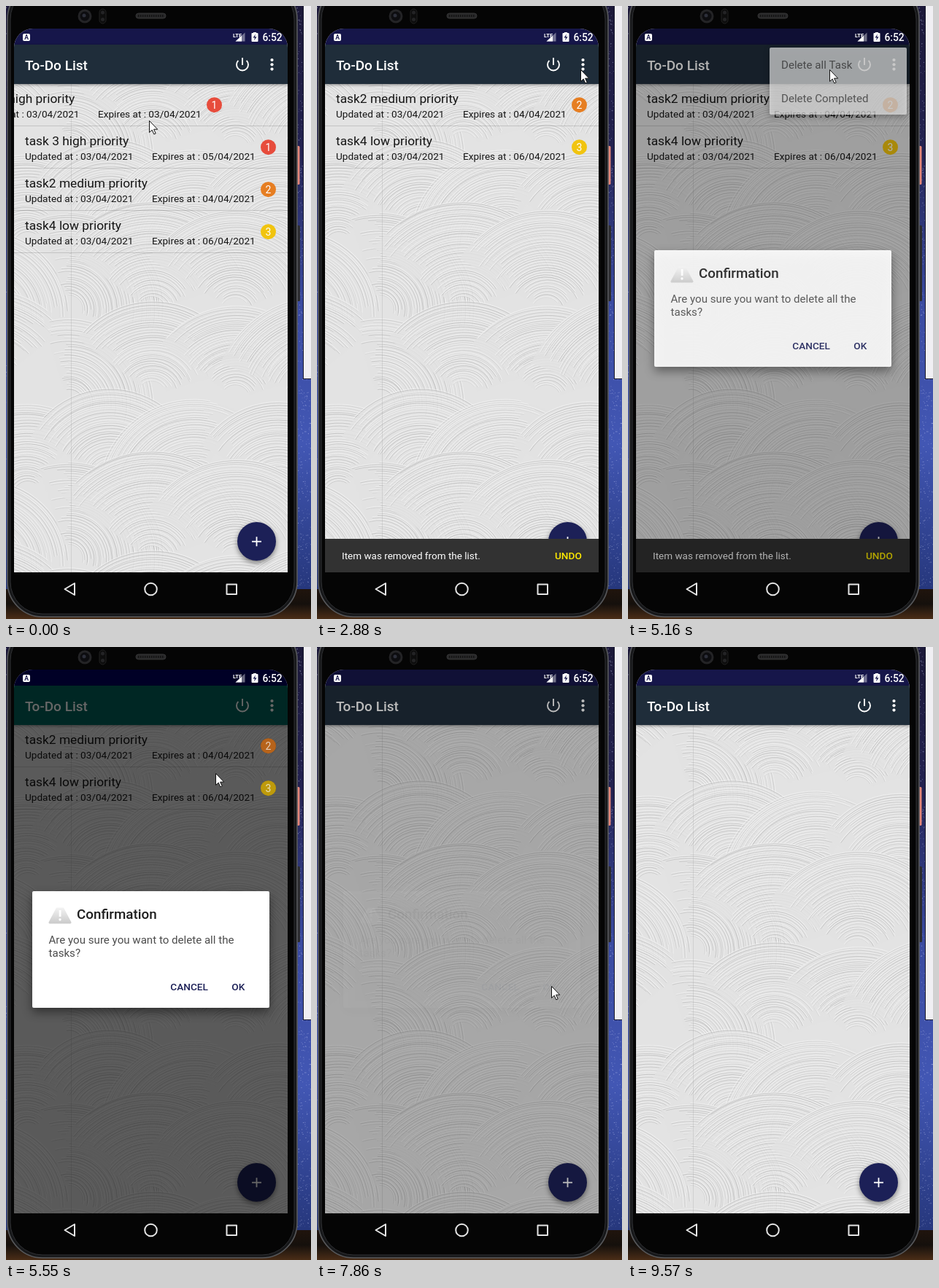
These frames come from a looping animation (418 by 841 pixels, 9970 ms). An HTML page with a canvas:

```html
<!DOCTYPE html>
<html lang="en">
<head>
<meta charset="utf-8">
<title>To-Do List</title>
<style>
html, body { margin: 0; width: 100%; height: 100%; overflow: hidden; background: #000; }
canvas { display: block; width: 418px; height: 841px; }
</style>
</head>
<body>
<canvas id="stage"></canvas>
<script>
const W = 418, H = 841, LOOP = 9970, TICKS = 74, TAU = Math.PI * 2;
const LEFT = 11, TOP = 31, WIDE = 375, TALL = 746, LIST_Y = 107, ROW_H = 58;
const NAVY = '#1c2057', INK = '#161616';
const ratio = window.devicePixelRatio || 1;
const canvas = document.getElementById('stage');
canvas.width = W * ratio;
canvas.height = H * ratio;
const view = canvas.getContext('2d');
let c = view;

const tasks = [
  { name: 'task 1 high priority', day: 3, level: 1 },
  { name: 'task 3 high priority', day: 5, level: 1 },
  { name: 'task2 medium priority', day: 4, level: 2 },
  { name: 'task4 low priority', day: 6, level: 3 }
];
const levelColors = ['#e74c3c', '#e67e22', '#f1c40f'];

// Pointer moves: first tick, last tick, destination
const moves = [
  [0, 4, 110, 148], [4, 8, 143, 120], [8, 10, 190, 115], [10, 16, 383, 95], [16, 21, 361, 87],
  [27, 31, 276, 87], [38, 41, 287, 173], [41, 44, 290, 377],
  [44, 47, 176, 460], [47, 50, 373, 490], [50, 53, 321, 465], [61, 69, 361, 822]
];

const ramp = (n, a, b) => Math.min(1, Math.max(0, (n - a) / (b - a)));
const pulse = (n, a, b, d, e) => ramp(n, a, b) - ramp(n, d, e);

function seeded(seed) {
  return () => (seed = (seed * 16807) % 2147483647) / 2147483647;
}

function rect(x, y, w, h, color) {
  c.fillStyle = color;
  c.fillRect(x, y, w, h);
}
function paint(fill, line, width) {
  if (fill) { c.fillStyle = fill; c.fill(); }
  if (line) { c.strokeStyle = line; c.lineWidth = width; c.stroke(); }
}
function box(x, y, w, h, r, fill, line, width = 1) {
  c.beginPath();
  c.roundRect(x, y, w, h, r);
  paint(fill, line, width);
}
function disc(x, y, r, fill, line, width = 1) {
  c.beginPath();
  c.arc(x, y, r, 0, TAU);
  paint(fill, line, width);
}
function poly(points, fill, line, width = 1) {
  c.beginPath();
  points.forEach(([x, y]) => c.lineTo(x, y));
  c.closePath();
  paint(fill, line, width);
}
function text(s, x, y, size, color, weight = 400, align = 'left') {
  c.font = `${weight} ${size}px Roboto, sans-serif`;
  c.textAlign = align;
  c.fillStyle = color;
  c.fillText(s, x, y);
}
function fade(y0, y1, ...colors) {
  const g = c.createLinearGradient(0, y0, 0, y1);
  colors.forEach((color, i) => g.addColorStop(i / (colors.length - 1), color));
  return g;
}
function raised(blur, dy, draw) {
  c.save();
  c.shadowColor = 'rgba(0,0,0,.45)';
  c.shadowBlur = blur * ratio;
  c.shadowOffsetY = dy * ratio;
  draw();
  c.restore();
}
function layer(alpha, draw) {
  c.save();
  c.globalAlpha = alpha;
  draw();
  c.restore();
}

function prerender(draw) {
  const sheet = document.createElement('canvas');
  sheet.width = canvas.width;
  sheet.height = canvas.height;
  c = sheet.getContext('2d');
  c.scale(ratio, ratio);
  draw();
  c = view;
  return sheet;
}

// One sweep of the brush: concentric strokes that start and end unevenly
function sweep(x, y, radius, tilt, rnd) {
  const from = tilt - 1.1, to = tilt + 1.1;
  c.beginPath();
  c.arc(x, y, radius, from, to);
  c.arc(x, y, 20, to, from, true);
  paint('rgba(227,227,227,.8)');
  for (let r = 20; r < radius; r += 2.2 + rnd() * 2.6) {
    const a = from + rnd() * 0.35, b = to - rnd() * 0.35;
    const wobble = rnd() * 4 - 2;
    c.beginPath();
    c.arc(x + wobble, y, r + 1.2, a, b);
    paint(null, 'rgba(246,246,246,.6)', 1.2);
    c.beginPath();
    c.arc(x + wobble, y, r, a, b);
    paint(null, `rgba(150,150,150,${0.1 + rnd() * 0.35})`, 0.9);
  }
}

const plaster = prerender(() => {
  rect(0, 0, W, H, '#e3e3e3');
  // The wall pattern repeats every 342 px downwards
  for (let tile = -1; tile < 3; tile++) {
    const rnd = seeded(4217);
    for (let i = 0; i < 15; i++) {
      const row = Math.floor(i / 5), col = i % 5;
      const x = -30 + col * 115 + (row % 2) * 58;
      const y = LIST_Y + 80 + row * 114 + tile * 342 + rnd() * 30;
      sweep(x, y, 115 + rnd() * 40, -TAU / 4 + (rnd() - 0.5) * 1.8, rnd);
    }
  }
  rect(89, LIST_Y, 0.7, 670, 'rgba(150,150,150,.35)');
});

const surround = prerender(() => {
  const rnd = seeded(77);
  rect(0, 0, W, H, fade(0, 800, '#1b1838', '#232252', '#3a4aa0', '#4257b4', '#26377c'));
  rect(0, 800, W, 41, fade(800, H, '#20140d', '#15100c', '#4a2d17'));
  for (let i = 0; i < 700; i++) {
    const x = rnd() < 0.9 ? 398 + rnd() * 20 : rnd() * 8;
    rect(x, rnd() * 795, 1, 1, `rgba(205,212,250,${0.1 + rnd() * 0.5})`);
  }
  rect(407, 0, 11, 512, '#17172a');
  rect(408, 0, 10, 511, '#f0eff3');

  box(398, 192, 4.5, 53, 1.5, '#e5877a');
  box(398, 301, 5, 104, 1.5, '#2c2c30');
  box(2, -30, 397, 868, 48, '#17181a', '#58595c', 1.6);
  box(6, -26, 389, 860, 44, '#050505', '#303134');

  disc(108, 14, 9.5, '#242426');
  disc(108, 14, 6.5, '#0d0d10');
  disc(107, 13, 2.5, '#2d2f3a');
  box(128, 4, 9, 20, 4.5, '#0d0d0d', '#222');
  for (const y of [9, 18.5]) disc(132.5, y, 2.5, '#232325');
  box(178, 10, 41, 7, 3.5, '#29292a', '#363637');
  for (let x = 181; x < 217; x += 3) rect(x, 12, 1.4, 3, '#131313');

  c.lineJoin = 'round';
  poly([[80.5, 800], [94, 792], [94, 808]], null, '#e4e4e4', 2);
  disc(198.5, 800, 8.3, null, '#e4e4e4', 2);
  c.strokeRect(302.5, 793.5, 13.5, 13.5);
});

function appBar(deep) {
  rect(LEFT, TOP, WIDE, 22, deep ? '#000060' : '#16164a');
  raised(4, 1, () => rect(LEFT, 53, WIDE, 54, deep ? '#00625a' : '#1f2d3a'));
  text('To-Do List', 26, 88, 19, '#fff', 500);
  c.beginPath();
  c.arc(324, 80.5, 8, -TAU / 8, TAU * 5 / 8);
  c.moveTo(324, 71);
  c.lineTo(324, 81);
  paint(null, '#fff', 1.9);
  for (let i = -1; i < 2; i++) disc(364.5, 80.3 + i * 6.3, 2.1, '#fff');
}

function statusIcons() {
  box(23, 38, 10, 10, 2, '#fff');
  text('A', 28, 46.4, 8.5, '#16164a', 700, 'center');
  text('LTE', 311, 42.5, 7.5, '#fff', 700);
  poly([[314.5, 48.5], [327.5, 48.5], [327.5, 36.5]], 'rgba(255,255,255,.4)');
  poly([[314.5, 48.5], [323, 48.5], [323, 40.7]], '#fff');
  rect(339, 36, 4, 2, '#fff');
  box(336.5, 37, 9, 12, 1, '#fff');
  poly([[342, 38.5], [338.5, 43.5], [341, 43.5], [340, 47.5], [343.6, 42.3], [341, 42.3]], '#16164a');
  text('6:52', 351.5, 47.5, 13.8, '#fff', 500);
}

function badge({ task, dx, y }) {
  disc(359.5 + dx, y + 28.7, 10.5, levelColors[task.level - 1]);
  text(task.level, 359.5 + dx, y + 33.7, 14, '#fff', 400, 'center');
}

function listRows(n) {
  if (n >= 58) return [];
  const shifts = [-74 - 301 * ramp(n, 0, 3), 376 * ramp(n, 8, 13) ** 2.27, 0, 0];
  const lifts = [ramp(n, 3, 5), ramp(n, 13, 15)];
  let slot = 0;
  return tasks.map((task, i) => {
    const row = { task, dx: shifts[i], y: LIST_Y + ROW_H * slot };
    slot += 1 - (lifts[i] || 0);
    return row;
  }).filter(row => Math.abs(row.dx) < WIDE);
}

function drawRow(row) {
  const { task, dx, y } = row;
  text(task.name, 26 + dx, y + 26, 17.35, INK);
  text('Updated at : 03/04/2021', 26 + dx, y + 45.7, 13.6, INK);
  text(`Expires at : 0${task.day}/04/2021`, 200 + dx, y + 45.7, 13.6, INK);
  badge(row);
  rect(LEFT, y + 57, WIDE, 1, 'rgba(0,0,0,.14)');
}

function addButton() {
  raised(7, 3, () => disc(343.5, 734.5, 26.5, NAVY));
  rect(337, 733.8, 13, 1.8, '#fff');
  rect(342.6, 728.2, 1.8, 13, '#fff');
}

function snackbar(shown) {
  const y = 777 - 46 * shown;
  rect(LEFT, y, WIDE, 46, '#323232');
  text('Item was removed from the list.', 34, y + 28, 13.5, '#fff');
  text('UNDO', 326, y + 28.3, 13.6, '#ffeb00', 500);
}

function popup() {
  raised(8, 3, () => box(194, 57, 188, 92, 2, '#f2f2f2'));
  text('Delete all Task', 210, 86.3, 15.1, INK);
  text('Delete Completed', 210, 132.3, 15.1, INK);
}

function dialog() {
  raised(14, 6, () => box(36, 335, 325, 160, 2, '#fff'));
  const grey = fade(356, 380, '#f6f6f6', '#c9c9c9');
  c.lineJoin = 'round';
  poly([[70, 359], [78, 359], [88, 378], [60, 378]], grey, grey, 3);
  rect(72.7, 361, 2.8, 9, '#fff');
  disc(74, 374, 1.7, '#fff');
  text('Confirmation', 97, 372.5, 18.8, '#1e1e1e', 500);
  text('Are you sure you want to delete all the', 58.5, 406.5, 15.1, '#4c4c4c');
  text('tasks?', 58.5, 424.5, 15.1, '#4c4c4c');
  text('CANCEL', 225.3, 471.3, 13.6, NAVY, 500);
  text('OK', 309.3, 471.3, 13.6, NAVY, 500);
}

function pointer(n) {
  let x = 196, y = 157;
  for (const [a, b, toX, toY] of moves) {
    const u = ramp(n, a, b);
    x += (toX - x) * u;
    y += (toY - y) * u;
  }
  c.save();
  c.translate(x + 0.5, y + 0.5);
  c.lineJoin = 'miter';
  poly([[0, 0], [0, 16], [3.7, 12.6], [6.3, 18.4], [8.7, 17.4], [6.1, 11.7], [11.2, 11.7]], '#fff', '#111');
  c.restore();
}

function draw(n) {
  c.setTransform(ratio, 0, 0, ratio, 0, 0);
  c.drawImage(surround, 0, 0, W, H);
  const dim = 0.6 * pulse(n, 36, 40, 57, 58.8);
  const deep = dim > 0.55;
  const rows = listRows(n);

  c.save();
  c.beginPath();
  c.roundRect(LEFT, TOP, WIDE, TALL, [26, 26, 0, 0]);
  c.clip();
  c.drawImage(plaster, 0, 0, W, H);
  rows.forEach(drawRow);
  appBar(deep);
  addButton();
  snackbar(pulse(n, 3, 5, 13, 15) + pulse(n, 16, 18, 38, 40));
  rect(LEFT, TOP, WIDE, TALL, `rgba(0,0,0,${dim})`);
  if (deep) layer(0.65, () => rows.forEach(badge));
  statusIcons();
  layer(pulse(n, 24, 26, 37, 39.8), popup);
  layer(pulse(n, 36, 38.2, 57, 58.05), dialog);
  c.restore();

  if (n < 71) pointer(n);
}

const start = performance.now();
function run() {
  const t = (performance.now() - start) % LOOP;
  draw(Math.floor(t / LOOP * TICKS));
  requestAnimationFrame(run);
}
run();
</script>
</body>
</html>
```
